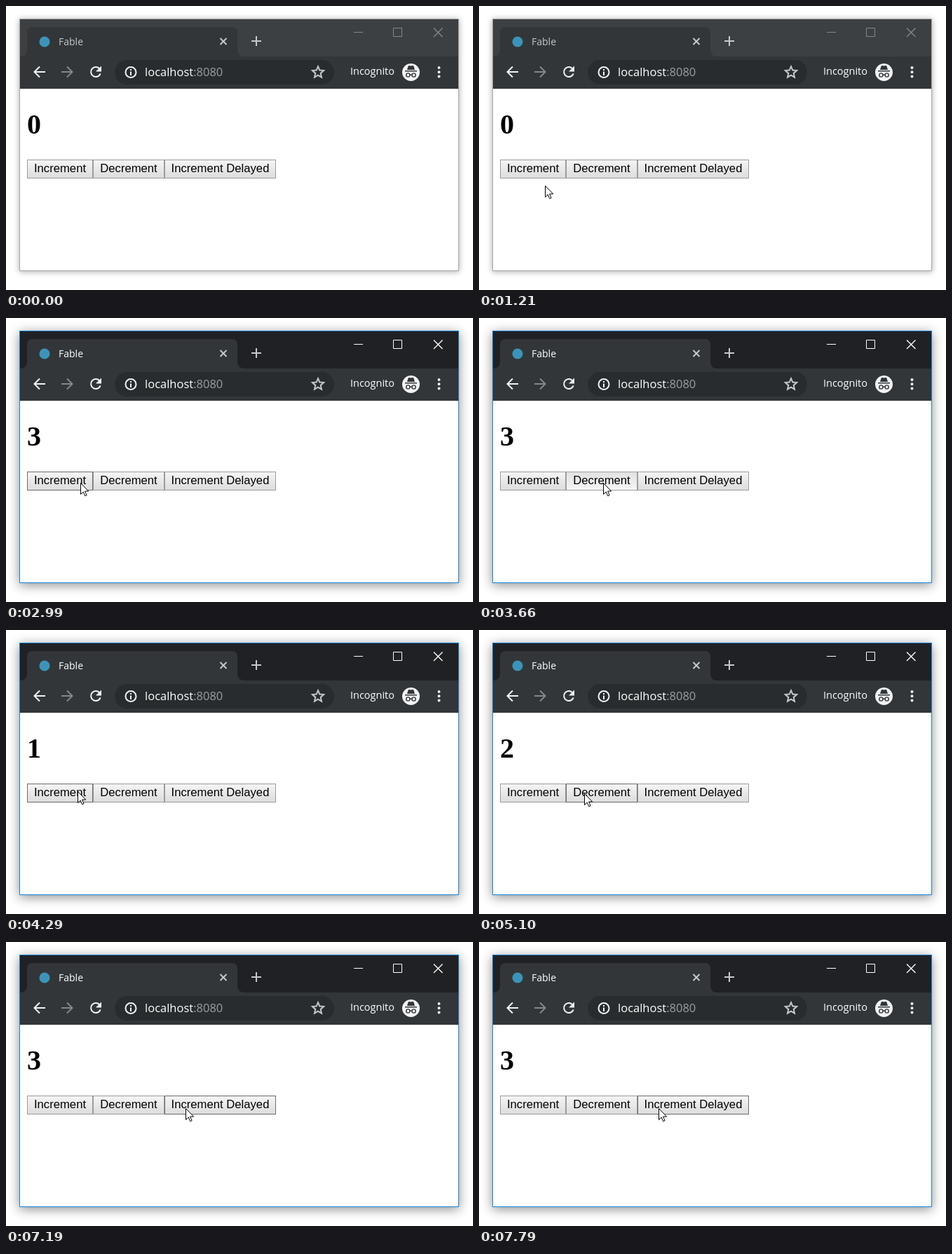
These frames come from a looping animation (666 px wide and 405 px high, 8 s). An HTML page:

```html
<!DOCTYPE html>
<html lang="en">
<head>
<meta charset="utf-8">
<title>Counter</title>
<style>
  html, body { margin: 0; width: 100%; height: 100%; overflow: hidden; background: #fff; }
  svg { display: block; width: 666px; height: 405px; }
  .ui { font-family: "Open Sans", "Noto Sans", sans-serif; font-weight: 500; fill: #fff; }
  .line { fill: none; stroke: #f1f3f4; stroke-width: 2; }
  .soft { stroke: #c6c9cc; }
  .dim { stroke: #85888b; }

  #shell { fill: #a8a8a8; filter: drop-shadow(0 1px 4px rgba(0, 0, 0, .34)); }
  #frame { fill: #3c4043; }
  #caption { fill: none; stroke: #85888a; }
  #title { fill: #c3c6c9; }
  .active #shell { fill: #1883d7; filter: drop-shadow(0 3px 8px rgba(0, 0, 0, .45)); }
  .active #frame { fill: #202124; }
  .active #caption { stroke: #fff; }
  .active #title { fill: #fff; }

  #count { font: bold 40px "Liberation Serif", serif; }
  .button text { font: 16.67px "Liberation Sans", sans-serif; text-anchor: middle; }
  .button rect { fill: url(#raised); stroke: #9c9c9c; }
  .button.hover rect { stroke: #6c6c6c; }
  .button.pressed rect { fill: url(#sunken); stroke: #a0a0a0; }
</style>
</head>
<body>
<svg id="stage" viewBox="0 0 666 405">
  <defs>
    <linearGradient id="raised" x2="0" y2="1">
      <stop stop-color="#f5f5f5"/><stop offset="1" stop-color="#dcdcdc"/>
    </linearGradient>
    <linearGradient id="sunken" x2="0" y2="1">
      <stop stop-color="#e1e1e1"/><stop offset="1" stop-color="#f6f6f6"/>
    </linearGradient>
  </defs>

  <!-- Window and title bar -->
  <rect id="shell" x="19" y="18" width="627" height="360"/>
  <rect x="20" y="118" width="625" height="259" fill="#fff"/>
  <rect id="frame" x="20" y="19" width="625" height="53"/>
  <path fill="#323639" d="M20 72q10 0 10-10V38q0-8 8-8h284q8 0 8 8v24q0 10 10 10h305v46H20z"/>
  <circle cx="55" cy="51" r="7.5" fill="#3c93ba"/>
  <text id="title" class="ui" x="75" y="56" font-size="14">Fable</text>
  <path class="line soft" d="M305.5 46l9 9m0-9l-9 9M350 50h14m-7-7v14"/>
  <g id="caption">
    <path d="M496 37.5h13M552.5 31.5h12v12h-12z"/>
    <path stroke-width="1.4" d="M610 31.5l12.5 12.5m0-12.5l-12.5 12.5"/>
  </g>

  <!-- Toolbar -->
  <path class="line" d="M56 94H41m7-7.5L40.5 94l7.5 7.5"/>
  <path class="line dim" d="M79 94h15m-7-7.5l7.5 7.5-7.5 7.5"/>
  <path class="line" d="M134.7 96.3A7 7 0 1 1 133 89"/>
  <path fill="#f1f3f4" d="M136 85.5v8h-8z"/>
  <rect x="155" y="77" width="313" height="35" rx="17.5" fill="#282c2f"/>
  <circle class="line" cx="178" cy="94.5" r="7.5"/>
  <path class="line" d="M178 90v2m0 1.5v5.5"/>
  <text class="ui" x="198" y="100" font-size="16.5">localhost<tspan fill="#9aa0a6">:8080</tspan></text>
  <path class="line soft" d="M445 86.200l2.300 5.400 5.800.5-4.400 3.800 1.300 5.700-5-3-5 3 1.300-5.700-4.400-3.800 5.800-.5z"/>
  <text class="ui" x="491" y="98" font-size="14.5">Incognito</text>
  <circle cx="577.5" cy="94.5" r="12.5" fill="#f1f3f4"/>
  <path fill="#323639" d="M572 91l1.500-5q.5-1.500 2-1l2 .5 2-.5q1.500-.5 2 1l1.500 5zM569 92h17v1.500h-17z"/>
  <g fill="none" stroke="#323639" stroke-width="1.4">
    <circle cx="573.4" cy="98.500" r="2.600"/><circle cx="581.6" cy="98.500" r="2.600"/>
    <path d="M576 98.500q1.500-1 3 0"/>
  </g>
  <path stroke="#f1f3f4" stroke-width="4" stroke-linecap="round" d="M617.5 88h0m0 6.300h0m0 6.300h0"/>

  <!-- Page -->
  <text id="count" x="30" y="182">0</text>
  <g id="buttons"></g>
  <path id="cursor" fill="#fff" stroke="#000" d="M.5.5v16l3.700-3.500 2.500 5.700 2.400-1-2.500-5.700h5.100z"/>
</svg>
<script>
const LOOP = 8000, HOLD = 80;
const TOP = 219, BOTTOM = 246;

// Each click takes effect when released, plus the button's delay.
const buttons = [
  { label: "Increment", left: 30, right: 124, step: 1, delay: 0, clicks: [2020, 2120, 2490, 4440] },
  { label: "Decrement", left: 124, right: 226, step: -1, delay: 0, clicks: [3600, 3790] },
  { label: "Increment Delayed", left: 226, right: 385, step: 1, delay: 980, clicks: [6130, 7710] }
];

// The cursor rests between glides.
const entry = { x: 416, y: 388 };
const glides = [
  { from: 200, to: 950, x: 160, y: 300 },
  { from: 1030, to: 1210, x: 94, y: 256 },
  { from: 1210, to: 1700, x: 77, y: 235 },
  { from: 2760, to: 3560, x: 177, y: 235 },
  { from: 4130, to: 4290, x: 102, y: 230 },
  { from: 4840, to: 5620, x: 246, y: 238 },
  { from: 5720, to: 6040, x: 256, y: 237 }
];

const byId = id => document.getElementById(id);
const stage = byId("stage"), count = byId("count"), cursor = byId("cursor");

byId("buttons").innerHTML = buttons.map(({ label, left, right }) => `
  <g class="button">
    <rect x="${left + .5}" y="${TOP + .5}" width="${right - left - 1}" height="${BOTTOM - TOP - 1}"/>
    <text x="${(left + right) / 2}" y="237">${label}</text>
  </g>`).join("");
const buttonNodes = [...document.querySelectorAll(".button")];

function cursorAt(t) {
  let { x, y } = entry;
  for (const glide of glides) {
    const k = Math.min(1, Math.max(0, (t - glide.from) / (glide.to - glide.from)));
    x += (glide.x - x) * k;
    y += (glide.y - y) * k;
  }
  return [Math.round(x), Math.round(y)];
}

function countAt(t) {
  return buttons.reduce((sum, { step, delay, clicks }) =>
    sum + step * clicks.filter(press => t >= press + HOLD + delay).length, 0);
}

function render(t) {
  const [x, y] = cursorAt(t);
  stage.classList.toggle("active", t >= buttons[0].clicks[0]);
  count.textContent = countAt(t);
  cursor.setAttribute("transform", `translate(${x} ${y})`);
  cursor.setAttribute("visibility", t >= glides[0].from ? "visible" : "hidden");
  buttons.forEach(({ left, right, clicks }, i) => {
    const hover = y >= TOP && y < BOTTOM && x >= left && x < right;
    const pressed = clicks.some(press => t >= press && t < press + HOLD);
    buttonNodes[i].classList.toggle("hover", hover);
    buttonNodes[i].classList.toggle("pressed", pressed);
  });
}

const start = performance.now();
function tick() {
  render((performance.now() - start) % LOOP);
  requestAnimationFrame(tick);
}
tick();
</script>
</body>
</html>
```
